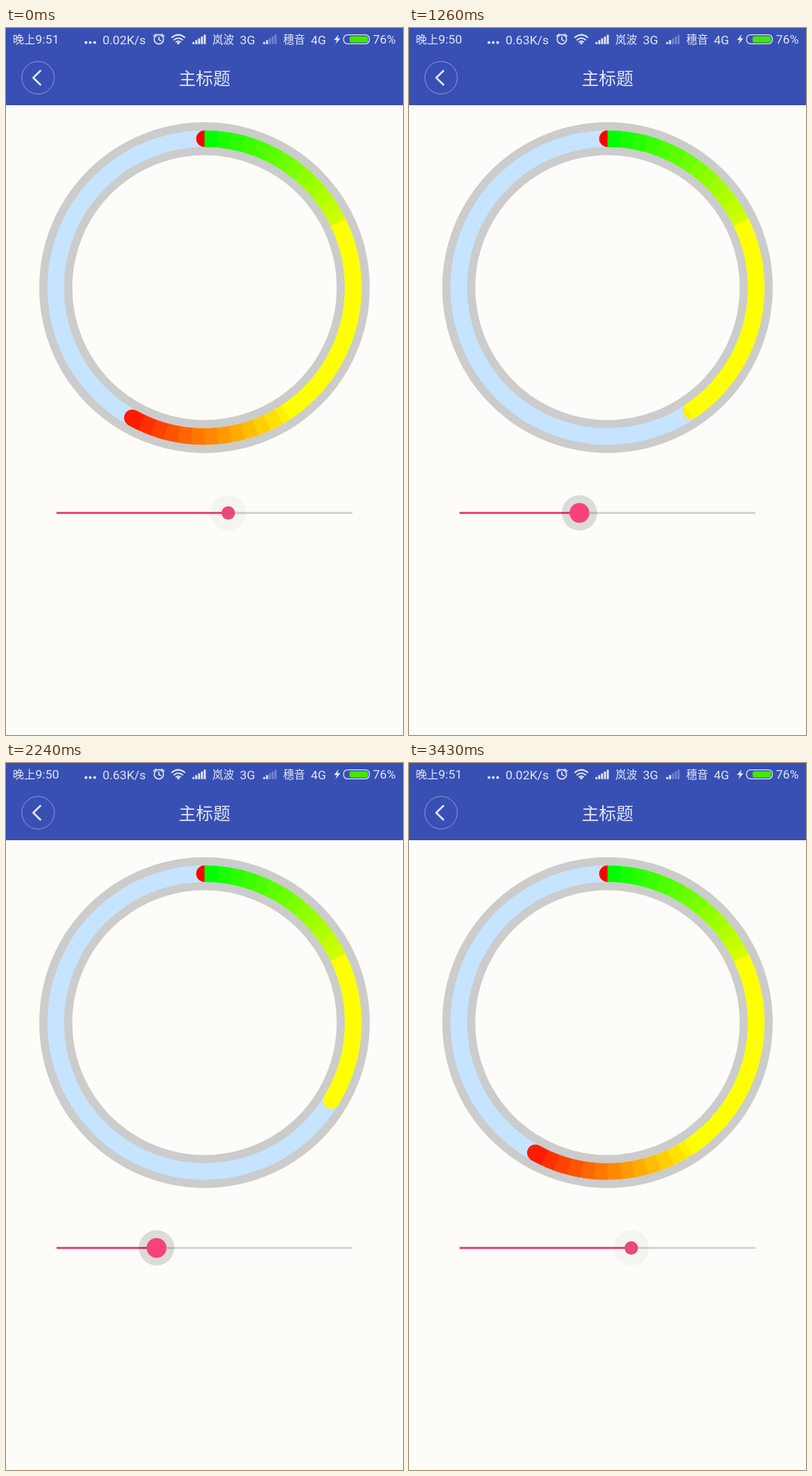
These frames come from a looping animation (561x998 px, 3500 ms). An HTML page:

```html
<!DOCTYPE html>
<html lang="zh">
<head>
<meta charset="utf-8">
<title>Ring progress</title>
<style>
  html, body { margin: 0; width: 100%; height: 100%; overflow: hidden; background: #fdfcf8; }
  svg { display: block; width: 561px; height: 998px; }
  text { font-family: Roboto, "Noto Sans CJK SC", "Noto Sans CJK", sans-serif; fill: #e3e7f5; font-size: 17.4px; }
  .cjk { font-size: 15.4px; }
  .title { font-size: 24.4px; font-weight: 300; text-anchor: middle; }
  .line { fill: none; stroke: #e3e7f5; stroke-linecap: round; stroke-linejoin: round; }
  .ring { fill: none; }
</style>
</head>
<body>
<svg viewBox="0 0 561 998">
  <defs>
    <mask id="sweep" maskUnits="userSpaceOnUse" x="0" y="109" width="561" height="520">
      <circle id="dash" class="ring" cx="280.5" cy="366.5" r="210.2" stroke="#fff" stroke-width="23.5"
        stroke-linecap="round" pathLength="360" transform="rotate(-90 280.5 366.5)"/>
    </mask>
  </defs>
  <rect width="561" height="998" fill="#fdfcf8"/>
  <rect width="561" height="109" fill="#3850b4"/>

  <g id="status" fill="#e3e7f5">
    <text x="9.5" y="22.3"><tspan font-size="16">晚上</tspan><tspan id="clock"></tspan></text>
    <circle cx="113" cy="20.5" r="2"/><circle cx="119" cy="20.5" r="2"/><circle cx="125.3" cy="20.5" r="2"/>
    <text id="speed" x="136.5" y="22.5"></text>
    <g class="line" stroke-width="1.6">
      <circle cx="216" cy="16" r="6.6"/>
      <path d="M216 12.5V16.5L219 18M208.5 11.5L212 8.5M223.5 11.5L220 8.5"/>
    </g>
    <g class="line" stroke-width="2">
      <path d="M234.5 13.3Q243.5 6 252.5 13.3M237.5 16.7Q243.5 11.8 249.5 16.7M240.5 19.8Q243.5 17.3 246.5 19.8"/>
    </g>
    <circle cx="243.5" cy="21.5" r="1.7"/>
    <text class="cjk" x="291.5" y="22">岚波</text>
    <text x="330.5" y="22.5" font-size="18">3G</text>
    <text class="cjk" x="391.8" y="22">穗音</text>
    <text x="430.7" y="22.5" font-size="18">4G</text>
    <path d="M470 9L463.5 17H467.5L465.5 23L472.5 14.5H468.5Z"/>
    <rect class="line" x="477" y="9.7" width="36.5" height="12.6" rx="5.5" stroke-width="1.3"/>
    <rect x="485.5" y="11.7" width="26" height="8.8" rx="2.5" fill="#43e800"/>
    <text x="518.5" y="22.3">76%</text>
  </g>

  <circle class="ring" cx="45.3" cy="70.2" r="23" stroke="#fff" stroke-opacity=".42"/>
  <path class="line" d="M48.5 60.5L38.5 70.2L48.5 80" stroke-width="2.6"/>
  <text class="title" x="280.5" y="79.7">主标题</text>

  <circle class="ring" cx="280.5" cy="366.5" r="210.2" stroke="#cbcccb" stroke-width="46.6"/>
  <circle class="ring" cx="280.5" cy="366.5" r="210.2" stroke="#c6e3ff" stroke-width="23.5"/>
  <g id="arc" class="ring" stroke-width="24.5" mask="url(#sweep)"></g>

  <rect x="71.5" y="683" width="418" height="3" fill="#d3d4d5"/>
  <rect id="fill" x="71.5" y="683" height="3" fill="#ee457b"/>
  <circle id="halo" cy="684.5" r="25" fill="#04383c" fill-opacity=".035"/>
  <circle id="ripple" fill="#000" fill-opacity=".1"/>
  <circle id="thumb" cy="684.5"/>
</svg>
<script>
const $ = id => document.getElementById(id);
const make = (parent, tag, attrs) => {
  const el = document.createElementNS('http://www.w3.org/2000/svg', tag);
  set(el, attrs);
  parent.append(el);
};
function set(el, attrs) {
  for (const k in attrs) el.setAttribute(k, attrs[k]);
}
const clamp = v => Math.max(0, Math.min(1, v));
const mix = (a, b, k) => a + (b - a) * k;

const LOOP = 3500, STEP = 70, DOWN = 910, UP = 3290;
// [ms, degrees] of the dragged value
const keys = [[910, 31.5], [1540, 281.5], [1715, 325], [1960, 246],
  [2240, 121.5], [2450, 62], [2730, 82.3], [3220, 209]];

// Signal bars; the second network is weak
for (const [x0, lit] of [[263.5, 5], [363.5, 2]]) {
  for (let i = 0; i < 5; i++) {
    const h = 3 + i * 2.6;
    make($('status'), 'rect', { x: x0 + i * 4, y: 22.8 - h, width: 2.8, height: h, opacity: i < lit ? 1 : 0.35 });
  }
}

function colour(a) {
  if (a < 64) return `rgb(${Math.round(Math.max(0, a) / 76 * 255)},255,0)`;
  if (a < 147) return '#ff0';
  return `rgb(255,${a < 212 ? Math.round((216 - a) / 72 * 255) : 0},0)`;
}

function point(a) {
  const r = a * Math.PI / 180;
  return `${280.5 + 210.2 * Math.sin(r)} ${366.5 - 210.2 * Math.cos(r)}`;
}

// Colour bands, with room for the round cap before zero
const edges = [-4];
for (let a = 5; a <= 360; a += 5) edges.push(a === 65 ? 64 : a === 145 ? 147 : a === 210 ? 212 : a);
edges.slice(1).forEach((to, i) => {
  const from = edges[i];
  make($('arc'), 'path', {
    d: `M${point(from)}A210.2 210.2 0 0 1 ${point(to + (to < 356 ? 0.3 : 0))}`,
    stroke: colour(i ? (from + to) / 2 : 0)
  });
});

// Tangent is flat at the ends and turning points
function slope(i) {
  const p = keys[i - 1], k = keys[i], n = keys[i + 1];
  if (!p || !n || (k[1] - p[1]) * (n[1] - k[1]) <= 0) return 0;
  return (n[1] - p[1]) / (n[0] - p[0]);
}

function angle(t) {
  const last = keys.length - 1;
  if (t < STEP || t >= keys[last][0]) return keys[last][1];
  if (t < DOWN) return 0;
  const i = keys.findIndex(k => k[0] > t) - 1;
  const [t0, a0] = keys[i], [t1, a1] = keys[i + 1];
  const d = t1 - t0, u = (t - t0) / d, v = 1 - u;
  return v * v * (1 + 2 * u) * a0 + u * u * (3 - 2 * u) * a1
    + d * u * v * (v * slope(i) - u * slope(i + 1));
}

function draw(t) {
  const a = angle(t), x = 72 + a / 360 * 417;
  const idle = t >= STEP && t < DOWN;
  const held = t >= DOWN && t < UP + 2 * STEP;
  const grow = clamp((t - DOWN) / 140);
  const press = held ? Math.min(mix(0.2, 1, grow), clamp((UP + 140 - t) / 140)) : 0;

  $('clock').textContent = t >= STEP && t < 3080 ? '9:50' : '9:51';
  $('speed').textContent = t >= STEP && t < 2520 ? '0.63K/s' : '0.02K/s';
  set($('dash'), { 'stroke-dasharray': `${a} 720`, visibility: a > 0 ? 'visible' : 'hidden' });
  set($('fill'), { width: x - 71.5 });
  set($('halo'), { cx: x, visibility: idle ? 'hidden' : 'visible' });
  set($('ripple'), {
    cx: x, cy: mix(699, 684.5, grow), r: mix(4, 25, grow),
    opacity: held ? clamp((UP + 140 - t) / 140) : 0
  });
  set($('thumb'), { cx: x, r: mix(9.5, 14, press), fill: press ? '#f8427a' : '#ea4a7b' });
}

const start = performance.now();
function tick() {
  const t = (performance.now() - start) % LOOP;
  draw(Math.floor(t / STEP) * STEP);
  requestAnimationFrame(tick);
}
draw(0);
requestAnimationFrame(tick);
</script>
</body>
</html>
```
